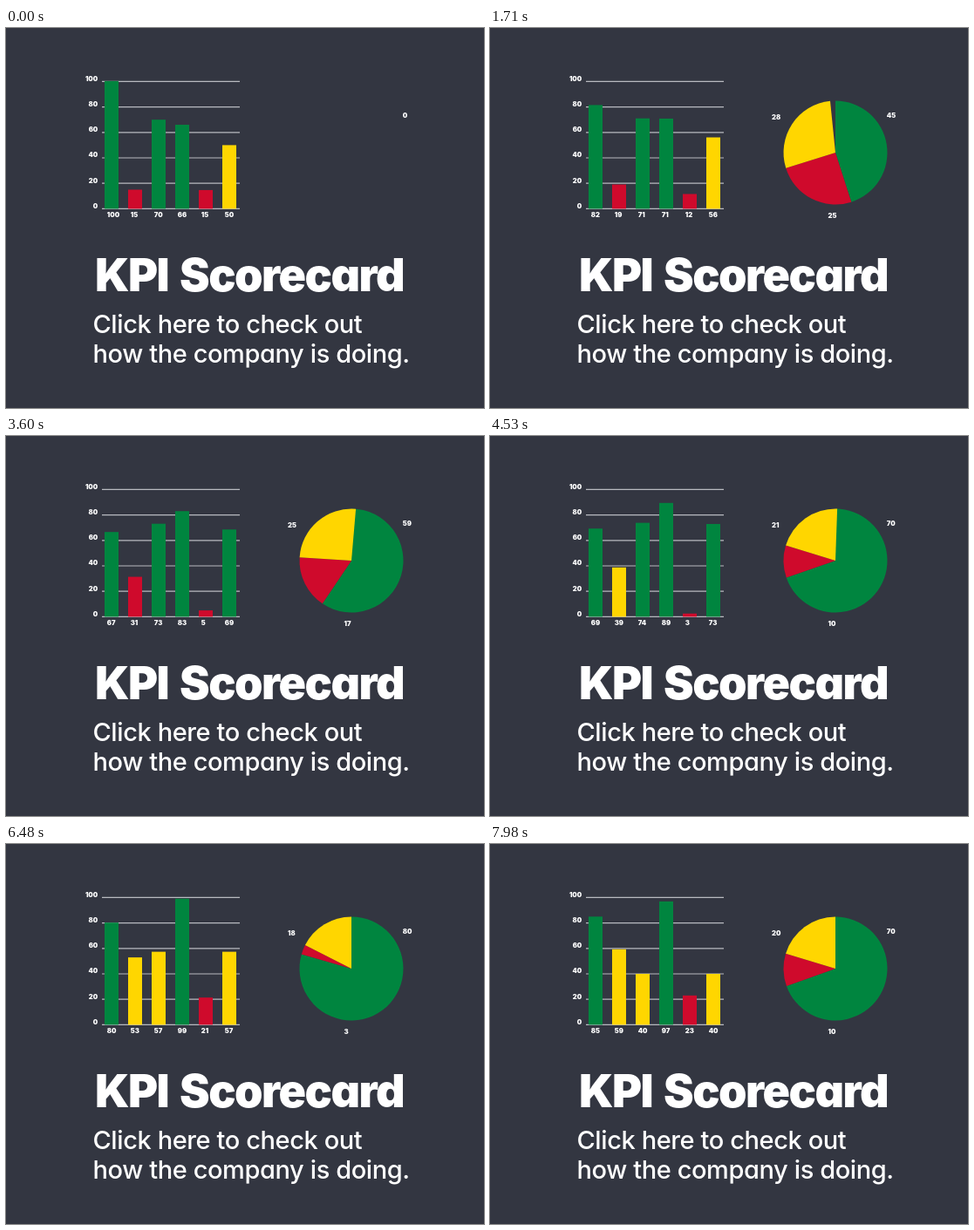
Recreate the animation shown at these times as an HTML page. Size 548 by 436 pixels, loop 8000 ms.

```html
<!DOCTYPE html>
<html lang="en">
<head>
<meta charset="utf-8">
<title>KPI Scorecard</title>
<style>
  html, body { margin: 0; width: 100%; height: 100%; overflow: hidden; background: #333641; }
  svg { display: block; width: 548px; height: 436px; }
  text { font-family: Inter, Lato, sans-serif; fill: #fff; font-feature-settings: "cv11"; }
  .num { font-size: 7.7px; font-weight: 900; }
  .title { font-size: 52px; font-weight: 900; letter-spacing: -1.5px; word-spacing: 4px; }
  .sub { font-size: 29px; font-weight: 500; letter-spacing: -0.4px; }
</style>
</head>
<body>
<svg id="stage" viewBox="0 0 548 436">
  <rect width="548" height="436" fill="#333641"/>
  <text class="title" x="102" y="302">KPI Scorecard</text>
  <text class="sub" x="99.5" y="350">Click here to check out</text>
  <text class="sub" x="99.5" y="384">how the company is doing.</text>
</svg>
<script>
const LOOP = 8000, WIPE = 1850;
const GREEN = '#00853f', RED = '#cf0a2c', YELLOW = '#ffd600';
const BASE = 207.4, UNIT = 1.46, STEP = 27;
const CX = 396, CY = 143, R = 59.5;
const stage = document.getElementById('stage');

function add(name, attrs) {
  const el = document.createElementNS('http://www.w3.org/2000/svg', name);
  set(el, attrs);
  return stage.appendChild(el);
}

function set(el, attrs) {
  for (const key in attrs) el.setAttribute(key, attrs[key]);
}

function number(x, y, value = '', anchor = 'start') {
  const el = add('text', { class: 'num', x, y, 'text-anchor': anchor });
  el.textContent = value;
  return el;
}

const clamp = (v, lo, hi) => Math.max(lo, Math.min(hi, v));
const smooth = u => u * u * (3 - 2 * u);

// A value that eases from one [time, value] key to the next.
const track = (...keys) => t => keys.slice(1).reduce((v, [end, to], i) => {
  const [begin, from] = keys[i];
  return v + (to - from) * smooth(clamp((t - begin) / (end - begin), 0, 1));
}, keys[0][1]);

const bars = [
  track([-300, 101], [3400, 66.5], [8000, 85]),
  track([150, 15], [8600, 60]),
  track([0, 70], [5200, 74], [7800, 40]),
  track([0, 66], [7200, 100], [11400, 66]),
  track([0, 14.7], [5400, 1.6], [6700, 23]),
  track([0, 50], [5200, 74], [7800, 40])
];

// Each wedge runs from the end of the one before it.
const wedges = [
  { fill: GREEN, x: 454.8, y: 102.8, end: track([1540, 44.9], [6200, 80], [8500, 68]) },
  { fill: RED, x: 387.5, y: 218.2, end: track([1400, 70], [6000, 82.8], [8500, 79.3]) },
  { fill: YELLOW, x: 323, y: 104.8, end: track([1700, 100], [3400, 101.4], [5400, 100]) }
];

for (let v = 0; v <= 100; v += 20) {
  const y = BASE - v * UNIT;
  add('path', { d: `M110 ${y}H268`, stroke: '#b9bac0', 'stroke-width': 1.2 });
  number(105.3, y - 0.6, v, 'end');
}

const columns = bars.map((value, i) => ({
  value,
  rect: add('rect', { x: 113 + STEP * i, width: 16 }),
  label: number(115.7 + STEP * i, 217.4)
}));

for (const w of wedges) {
  w.path = add('path', { fill: w.fill });
  w.label = number(w.x, w.y);
}

function rim(percent) {
  const a = percent * Math.PI / 50;
  return `${CX + R * Math.sin(a)} ${CY - R * Math.cos(a)}`;
}

const sector = (from, to) => to - from < 0.01 ? '' :
  `M${CX} ${CY}L${rim(from)}A${R} ${R} 0 ${to - from > 50 ? 1 : 0} 1 ${rim(to)}Z`;

const grade = v => v < 33 ? RED : v < 65.5 ? YELLOW : GREEN;

function draw(t) {
  for (const { value, rect, label } of columns) {
    const v = value(t), height = v * UNIT;
    set(rect, { y: BASE - height, height, fill: grade(v) });
    label.textContent = Math.round(v);
  }

  const wipe = t < WIPE ? 100 * smooth(t / WIPE) : Infinity;
  let from = 0;
  wedges.forEach(({ end, path, label }, i) => {
    const to = clamp(wipe, from, end(t));
    set(path, { d: sector(from, to) });
    label.textContent = Math.round(to - from);
    // Later labels fade in as the sweep reaches their wedge.
    if (i) set(label, { opacity: clamp((wipe - from) / 16, 0, 1) });
    from = to;
  });
}

const start = performance.now();
function tick() {
  draw((performance.now() - start) % LOOP);
  requestAnimationFrame(tick);
}
draw(0);
requestAnimationFrame(tick);
</script>
</body>
</html>
```
